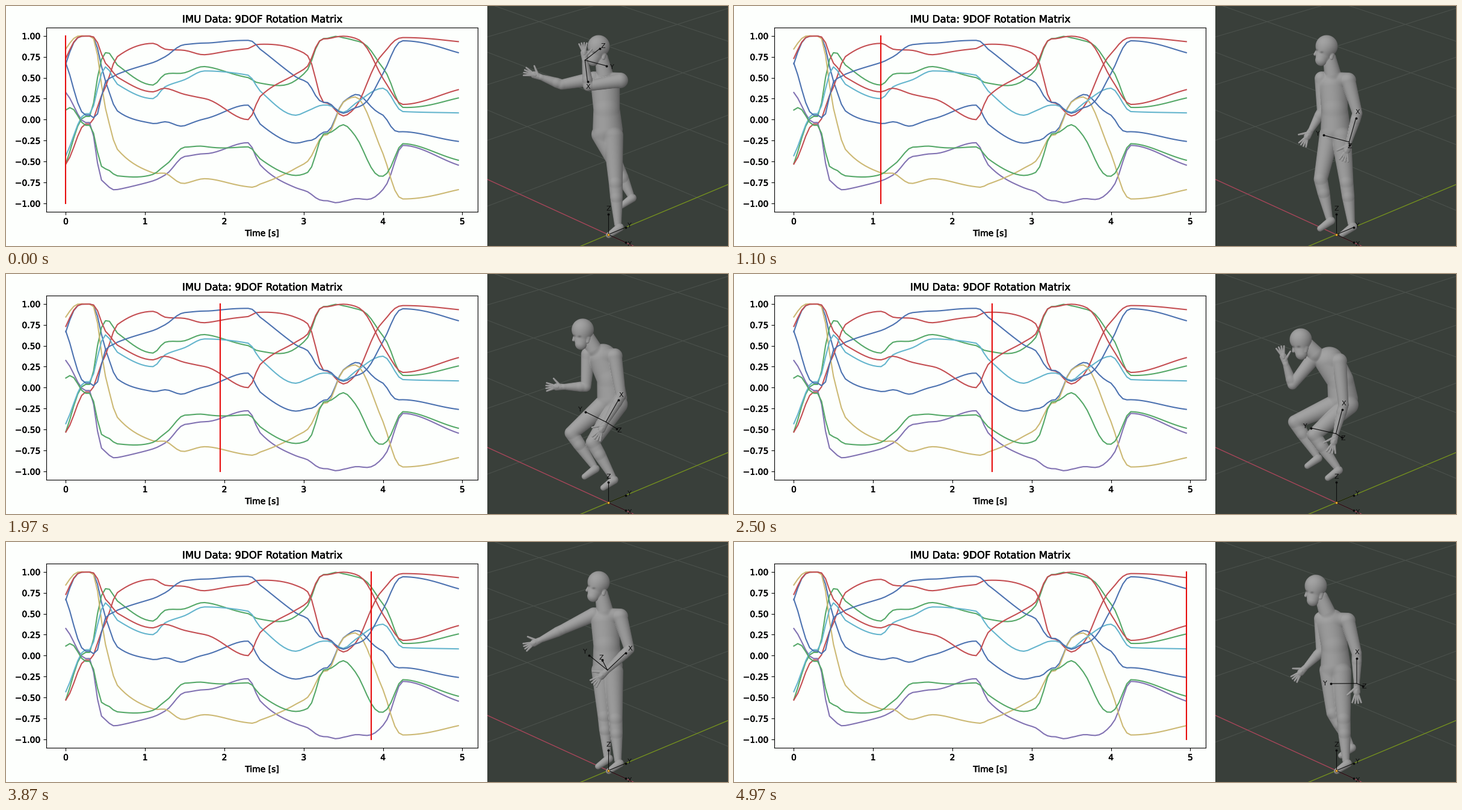
Animation of 1200x400 px, one loop 5010 ms. Source, as a matplotlib script:

```python
import numpy as np
import matplotlib.pyplot as plt
from matplotlib.animation import FuncAnimation
from matplotlib.patheffects import withStroke

STEPS, DT = 100, 0.05
FRAMES, INTERVAL = 167, 30
TIMES = np.arange(STEPS) * DT


def smooth(t, knots, vals):
    """Monotone cubic through the given points, held flat outside."""
    k, v = np.asarray(knots, float), np.asarray(vals, float)
    t = np.clip(t, k[0], k[-1])
    h = np.diff(k)
    s = np.diff(v) / h
    a, b = s[:-1], s[1:]
    up = a * b > 0
    m = np.zeros(len(v))
    m[1:-1][up] = 2 * (a * b)[up] / (a + b)[up]
    m[0], m[-1] = s[0], s[-1]
    i = np.clip(np.searchsorted(k, t, "right") - 1, 0, len(k) - 2)
    u = (t - k[i]) / h[i]
    return (v[i] * (1 + 2 * u) * (1 - u) ** 2 + m[i] * h[i] * u * (1 - u) ** 2
            + v[i + 1] * u * u * (3 - 2 * u) + m[i + 1] * h[i] * u * u * (u - 1))


def ease(t, start, end):
    u = np.clip((t - start) / (end - start), 0, 1)
    return u * u * (3 - 2 * u)


def bump(t, start, peak, end):
    return ease(t, start, peak) * (1 - ease(t, peak, end))


# --- sensor orientation: time, heading, pitch, roll in degrees ---
ORIENTATION = [
    (0, 69, -25.5, -36), (.25, 92, 4, -3), (.3, 92, 4, -3), (.5, 170, 39, 30),
    (.65, 203, 25, 56), (1.1, 221, 14.5, 70), (1.25, 224, 23, 66),
    (1.5, 240, 28.5, 70), (1.75, 240, 35.5, 72), (2.3, 251, 32, 90),
    (2.45, 235, 20, 73), (2.9, 215.5, 3, 57), (3.05, 210, 6, 50),
    (3.25, 191, 10, 12), (3.3, 190.5, 10, 11.5), (3.5, 168, 5, 2.5),
    (3.65, 164, 11, 8.5), (4, 206, 22, 58), (4.25, 252, 5.5, 79.5),
    (4.95, 237, 4.6, 69),
]


def rotation(t):
    """Rows are the sensor's X, Y and Z axes in world space."""
    knots, *angles = np.transpose(ORIENTATION)
    head, pitch, roll = (np.radians(smooth(t, knots, a)) for a in angles)
    ch, sh, cp, sp = np.cos(head), np.sin(head), np.cos(pitch), np.sin(pitch)
    y = np.stack([cp * ch, cp * sh, sp])
    side = np.stack([sh, -ch, 0 * sp])
    up = np.stack([-sp * ch, -sp * sh, cp])
    x = np.cos(roll) * side + np.sin(roll) * up
    z = np.cos(roll) * up - np.sin(roll) * side
    return np.stack([x, y, z]).transpose(2, 0, 1)


MATRIX = rotation(TIMES)
PALETTE = ("#4c72b0", "#55a868", "#c44e52", "#8172b2", "#ccb974", "#64b5cd")

# --- scene projection ---
ORIGIN = np.array([1001.0, 381.0])
UNIT = np.array([[31, 14], [31, -13], [0, -37]])
SENSOR = MATRIX @ UNIT


def floor(x, y):
    px = 155 * (x + y), 71 * x - 65 * y
    return ORIGIN + np.array(px) / (1 + 0.05 * (y - x))


# --- body pose: x, y on screen and depth towards the viewer ---
KEYS = [0, .7, 1.5, 2.5, 3.2, 3.85, 4.95]
R_WRIST = [(890, 119), (970, 204), (943, 207), (917, 150), (932, 121), (889, 163), (951, 208)]
R_ANKLE = [(1038, 315), (993, 360), (986, 340), (968, 302), (1006, 340), (999, 356), (1024, 338)]


def vec(*c):
    return np.array(c, float)


def mix(a, b, u):
    return a + (b - a) * u


def key_point(t, points, z):
    x, y = np.transpose(points)
    return vec(smooth(t, KEYS, x), smooth(t, KEYS, y), z)


def bend(a, b, la, lb, side):
    """Middle joint of a two-bone limb from a to b."""
    d = np.hypot(*(b - a)[:2])
    along = (d * d + la * la - lb * lb) / (2 * d)
    out = side * np.sqrt(max(la * la - along * along, 0))
    ux, uy = (b - a)[:2] / d
    return mix(a, b, along / d) + vec(-uy, ux, 0) * out


def extend(a, b, size):
    return b + (b - a) * size / np.hypot(*(b - a)[:2])


def knee(hip, ankle):
    # a leg trailing away from the viewer looks straighter
    trail = np.clip((ankle[0] - hip[0]) / 45, 0, 1)
    return bend(hip, ankle, 76, 66, 1 - trail ** 2) + vec(0, 0, 6)


def pose(step):
    t = TIMES[step]
    crouch, bow = bump(t, 1.2, 2.5, 3.15), ease(t, 4, 4.95)
    stride = bump(t, 0, .7, 1.4)
    p = {}
    p["skull"] = vec(985, 67, 10) + crouch * vec(-43, 42, 0) + bow * vec(-18, 6, 0)
    p["chin"] = p["skull"] + vec(-9, 23, 0) + crouch * vec(10, 1, 0) + bow * vec(4, 1, 0)
    p["neck"] = p["skull"] + vec(10, 41, -10) + crouch * vec(14, -23, 0) + bow * vec(9, -2, 0)
    p["pelvis"] = vec(1000, 206, 0) + crouch * vec(12, 2, 0)
    for name, u in (("chest", 0.25), ("waist", 0.65)):
        p[name] = mix(p["neck"], p["pelvis"], u) + crouch * vec(12, -2, 0) + bow * vec(3, 0, 0)

    shift = crouch * vec(14, 2, 0) + bow * vec(8, 3, 0)
    p["r_sh"] = p["neck"] + vec(-18, 13, -4) + shift
    p["r_wr"] = key_point(t, R_WRIST, -10)
    p["r_el"] = bend(p["r_sh"], p["r_wr"], 54, 36, -1) - vec(0, 0, 5)
    p["r_tip"] = extend(p["r_el"], p["r_wr"], 31)

    fore = SENSOR[step, 0]
    lift = np.clip(fore[1] / 36, 0, 1)
    p["l_sh"] = p["neck"] + vec(26, 16, 8) + shift
    p["l_el"] = (p["l_sh"] + mix(vec(15, 55, 18), vec(-54, 9, 18), lift)
                 + crouch * vec(-8, 18, 0))
    p["l_wr"] = p["l_el"] - vec(*1.2 * fore, -8)
    p["l_tip"] = p["l_wr"] - vec(*0.82 * fore, -2)

    p["l_hip"], p["r_hip"] = p["pelvis"] + vec(9, 10, 2), p["pelvis"] + vec(-10, 8, -3)
    p["l_ank"] = vec(1017, 364, 8) + crouch * vec(-15, -42, 0) + stride * vec(23, -4, 0)
    p["r_ank"] = key_point(t, R_ANKLE, -10)
    for s in "lr":
        p[s + "_knee"] = knee(p[s + "_hip"], p[s + "_ank"])
        p[s + "_toe"] = p[s + "_ank"] + vec(-15, 18, 5)
    return p


# --- soft shaded body ---
X0, X1, Y0, Y1 = 830, 1080, 36, 400
GY, GX = np.mgrid[Y0:Y1, X0:X1] + 0.5
LIGHT = np.array([-0.35, -0.45, 0.8]) / np.linalg.norm([0.35, 0.45, 0.8])
BLEND = 10


class Clay:
    def __init__(self):
        self.depth = np.full(GX.shape, -1e3)
        self.normal = np.zeros((3,) + GX.shape)
        self.alpha = np.zeros(GX.shape)

    def limb(self, a, b, ra, rb, flat=1.0):
        """Rounded, tapered segment from a to b."""
        lo = np.minimum(a[:2] - ra, b[:2] - rb).astype(int) - 2 - (X0, Y0)
        hi = np.maximum(a[:2] + ra, b[:2] + rb).astype(int) + 3 - (X0, Y0)
        (x0, y0), (x1, y1) = np.maximum(lo, 0), np.maximum(hi, 0)
        box = (slice(y0, y1), slice(x0, x1))
        gx, gy = GX[box] - a[0], GY[box] - a[1]
        if gx.size == 0:
            return
        dx, dy, dz = b - a
        t = np.clip((gx * dx + gy * dy) / max(dx * dx + dy * dy, 1e-6), 0, 1)
        r = ra + (rb - ra) * t
        ex, ey = (gx - dx * t) / r, (gy - dy * t) / r
        q = ex * ex + ey * ey
        nz = np.sqrt(np.clip(1 - q, 0, 1))
        z = a[2] + dz * t + flat * r * nz
        cover = np.clip((1 - np.sqrt(q)) * r + 0.5, 0, 1)
        old = self.depth[box]
        s = np.clip((z - old) / BLEND + 0.5, 0, 1)
        w = cover * s * s * (3 - 2 * s)
        for n, e in zip(self.normal, (ex, ey, nz)):
            n[box] += w * (e - n[box])
        self.depth[box] = np.where(cover > 0.5, np.maximum(old, z), old)
        self.alpha[box] = np.maximum(self.alpha[box], cover)

    def chain(self, points, radii, flat=1.0):
        for a, b, ra, rb in zip(points, points[1:], radii, radii[1:]):
            self.limb(a, b, ra, rb, flat)

    def hand(self, wrist, tip):
        v = tip - wrist
        palm = mix(wrist, tip, 0.42)
        self.limb(wrist, palm, 5, 6, 0.7)

        def finger(start, angle, size):
            c, s = np.cos(angle), np.sin(angle)
            d = vec(c * v[0] - s * v[1], s * v[0] + c * v[1], v[2])
            self.limb(start, start + d * size, 2.6, 1.5)

        for angle in (-0.36, -0.12, 0.12, 0.36):
            finger(mix(wrist, palm, 0.85), angle, 0.62)
        finger(mix(wrist, palm, 0.4), 0.85, 0.6)

    def image(self, eyes):
        n = self.normal / np.maximum(np.sqrt((self.normal ** 2).sum(0)), 1e-6)
        lit = 0.5 + 0.5 * np.tensordot(LIGHT, n, 1)
        shade = 0.25 + 0.39 * lit ** 1.5
        for x, y in eyes:
            spot = np.exp(-((GX - x) / 3) ** 2 - ((GY - y) / 1.8) ** 2)
            shade -= 0.14 * spot * (self.depth < 30)
        rgba = np.stack([shade, shade, shade, self.alpha], axis=-1)
        return (np.clip(rgba, 0, 1) * 255).astype(np.uint8)


def body(step):
    p, clay = pose(step), Clay()
    clay.chain([p["chest"], p["waist"], p["pelvis"]], [24, 22, 25], 0.6)
    clay.limb(p["r_sh"], p["l_sh"], 12, 13, 0.8)
    clay.limb(p["neck"] + vec(0, 6, 0), mix(p["skull"], p["neck"], 0.5), 14, 11)

    skull, chin = p["skull"], p["chin"]
    v = chin - skull
    front = vec(-v[1], v[0], 0) / np.hypot(v[0], v[1])
    clay.limb(skull, skull, 18.5, 18.5)
    clay.limb(mix(skull, chin, 0.3), chin, 16, 10)
    clay.limb(mix(skull, chin, 0.5) + front * 13, mix(skull, chin, 0.8) + front * 13, 1.5, 2.5)
    clay.limb(skull + vec(9, 14, 6), skull + vec(8, 20, 6), 4, 3)
    eyes = [(mix(skull, chin, 0.5) + front * f)[:2] for f in (4, 14)]

    for side in "rl":
        j = {k: p[f"{side}_{k}"] for k in
             ("sh", "el", "wr", "tip", "hip", "knee", "ank", "toe")}
        clay.chain([j["hip"], j["knee"], mix(j["knee"], j["ank"], 0.35), j["ank"]],
                   [17, 11.5, 10.5, 6], 0.85)
        clay.chain([j["ank"] + vec(3, 5, 0), j["toe"]], [7, 5])
        clay.chain([j["sh"], j["el"], mix(j["el"], j["wr"], 0.25), j["wr"]],
                   [12, 8.5, 8.5, 5])
        clay.hand(j["wr"], j["tip"])
    return clay.image(eyes)


BODIES = [body(s) for s in range(STEPS)]

# --- figure ---
fig = plt.figure(figsize=(12, 4), dpi=100, facecolor="#fdfffd")

chart = fig.add_axes([66.8 / 1200, 57 / 400, 717.6 / 1200, 307.3 / 400],
                     facecolor="#fdfffd")
for i, curve in enumerate(MATRIX.reshape(STEPS, 9).T):
    chart.plot(TIMES, curve, color=PALETTE[i % len(PALETTE)], lw=1.5)
cursor, = chart.plot([0, 0], [-1, 1], color="#e60c0c", lw=1.5, zorder=12)
chart.set(title="IMU Data: 9DOF Rotation Matrix", xlabel="Time [s]",
          xticks=range(6), yticks=np.arange(-1, 1.01, 0.25),
          xlim=(-0.2475, 5.1975), ylim=(-1.1, 1.1))
for label in [chart.title, chart.xaxis.label,
              *chart.get_xticklabels(), *chart.get_yticklabels()]:
    label.set_path_effects([withStroke(linewidth=0.4, foreground="black")])

scene = fig.add_axes([800 / 1200, 0, 400 / 1200, 1], facecolor="#393f3a")


def floor_line(a, b, color, lw):
    scene.plot(*np.transpose([floor(*a), floor(*b)]), color=color, lw=lw, zorder=1)


for i in range(1, 9):
    floor_line((-12, i), (2, i), "#4b514c", 0.8)
    floor_line((-i, -2), (-i, 12), "#4b514c", 0.8)
floor_line((-12, 0), (2, 0), "#a8465a", 1)
floor_line((0, -2), (0, 12), "#74901f", 1)

figure = scene.imshow(BODIES[0], extent=(X0, X1, Y1, Y0), aspect="auto",
                      interpolation="nearest", zorder=2)


def make_gizmo():
    lines = [scene.plot([], [], color="#0c0c0c", lw=0.8, marker="o", ms=1.8,
                        markevery=[1], zorder=3)[0] for _ in range(3)]
    labels = [scene.text(0, 0, c, fontsize=8, color="#0c0c0c", ha="center",
                         va="center", zorder=4, clip_on=True) for c in "XYZ"]
    return lines, labels


def place(gizmo, at, axes):
    for line, label, v in zip(*gizmo, axes):
        line.set_data(*np.transpose([at, at + v]))
        label.set_position(at + 1.24 * v)


place(make_gizmo(), ORIGIN, UNIT * 0.93)
wrist_gizmo = make_gizmo()
scene.plot(*ORIGIN, "o", ms=3, color="#e8a530", mec="#3a2a10", mew=0.4, zorder=5)
scene.set(xlim=(800, 1200), ylim=(400, 0), xticks=[], yticks=[])
for spine in scene.spines.values():
    spine.set_visible(False)


def draw(frame):
    # samples alternate between 70 ms and 30 ms holds
    tens, rest = divmod(frame * INTERVAL + 20, 100)
    step = min(2 * tens + (rest >= 70), STEPS - 1)
    cursor.set_xdata([TIMES[step]] * 2)
    figure.set_data(BODIES[step])
    place(wrist_gizmo, pose(step)["l_wr"][:2], SENSOR[step])
    return cursor, figure


anim = FuncAnimation(fig, draw, frames=FRAMES, interval=INTERVAL,
                     repeat=True, repeat_delay=0, blit=False)
plt.show()
```
